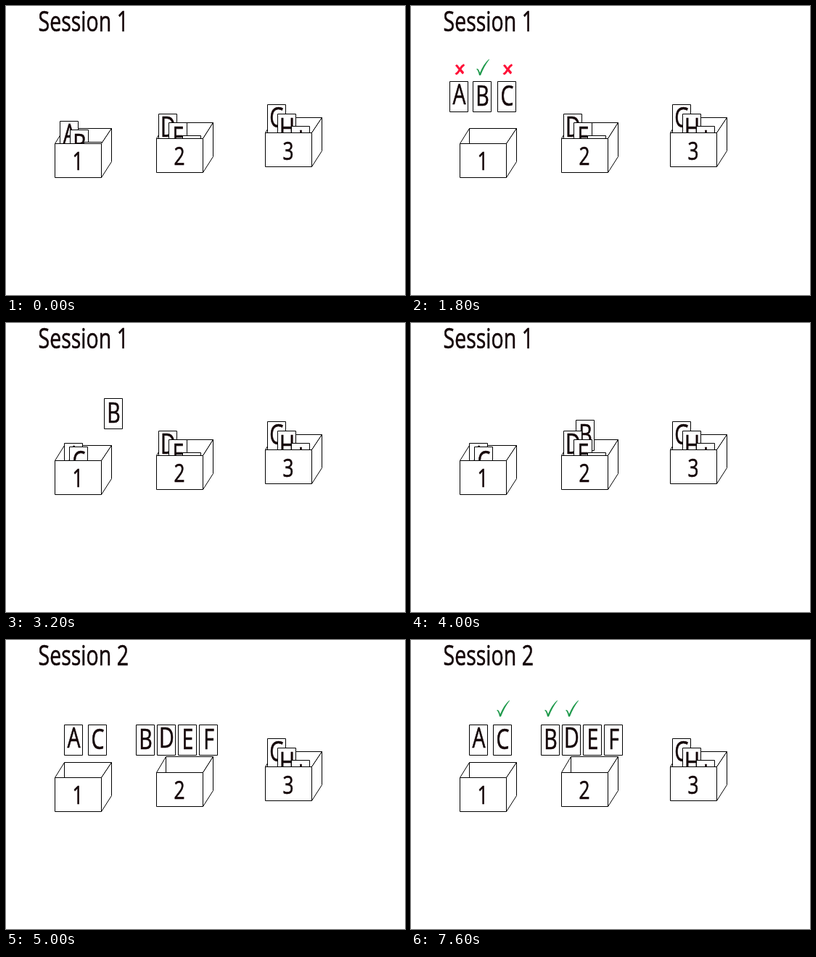
These frames come from a looping animation (550 px wide and 400 px high, 8000 ms). An HTML page with a canvas:

```html
<!DOCTYPE html>
<html lang="en">
<head>
<meta charset="utf-8">
<title>Card boxes</title>
<style>
  html, body { margin: 0; width: 100%; height: 100%; overflow: hidden; background: #fff; }
  canvas { display: block; }
</style>
</head>
<body>
<canvas id="stage" width="550" height="400"></canvas>
<script>
const ctx = document.getElementById('stage').getContext('2d');
const LOOP = 8000, TICK = 200, SESSION_2 = 21;
const INK = '#140608';
const CONDENSED = 0.75; // one narrow cut for all lettering

// Each box sits a little higher than the one before; its cards fan out from (cardX, cardY).
const boxes = [
  { x: 67, cardX: 74, cardY: 158.6 },
  { x: 207, cardX: 210, cardY: 149 },
  { x: 357, cardX: 360, cardY: 136.2 }
].map((box, i) => ({ ...box, y: 190 - 7.4 * i, digit: i + 1 }));

const cards = [...'ABCDEFGHI'].map((letter, i) => {
  const box = boxes[Math.floor(i / 3)], slot = i % 3;
  const spread = 2.5 * slot * (slot - 1);
  const home = { x: box.cardX + 14 * slot + spread, y: box.cardY + 12.4 * slot + spread };
  return { letter, home, baseline: slot ? 34 : 32, moves: [] };
});
const find = letter => cards.find(card => card.letter === letter);
const move = (letter, from, to, x, y) => find(letter).moves.push({ from, to, x, y });

[53, 85, 119].forEach((x, i) => move('ABC'[i], 0, 4, x, 104));
move('A', 10, 12, 80, 166);
move('C', 10, 12, 87, 171);
move('B', 14, 16, 135, 104);
move('B', 16, 19, 214, 118);
move('B', 19, 20, 227, 134);
[...'AC'].forEach((c, i) => move(c, SESSION_2, 25, 80 + 33 * i, 117));
[...'BDEF'].forEach((c, i) => move(c, SESSION_2, 25, 179 + 29 * i, 117));

// One card is marked every two ticks; crosses go first, then the ticks.
const quizzes = [
  { asked: 'ABC', known: 'B', start: 5, crossEnd: 11, tickEnd: 14, y: 85 },
  { asked: 'ACBDEF', known: 'CBD', start: 26, crossEnd: 38, tickEnd: 40, y: 95 }
];
const tickMark = {
  color: '#1f9a4c', dx: -10, dy: -12,
  path: new Path2D('M1 14Q4 12.5 6 19.5Q11 7 18.5 .5L19 1Q12 10 7 23L5 23Q3.5 16 1 14Z')
};
const crossMark = {
  color: '#ff1238', dx: -7, dy: -5.5,
  path: new Path2D('M1 3Q3 0 5 3L7 6Q9 2 13 .5L14 3Q11 5 9.5 8L13 12Q13 14 11 15L7.5 11Q5 15 2.5 16L.5 14Q4 12 5.5 8.5Z')
};

function text(str, x, y, size, align = 'center') {
  ctx.save();
  ctx.translate(x, y);
  ctx.scale(CONDENSED, 1);
  ctx.font = `${size}px "Open Sans", "Noto Sans", sans-serif`;
  ctx.textAlign = align;
  ctx.fillStyle = ctx.strokeStyle = INK;
  ctx.lineWidth = 0.6;
  ctx.fillText(str, 0, 0);
  ctx.strokeText(str, 0, 0);
  ctx.restore();
}

// Outlines lie on whole pixels.
function polygon(fill, ...points) {
  ctx.beginPath();
  for (const [x, y] of points) ctx.lineTo(Math.round(x) + 0.5, Math.round(y) + 0.5);
  ctx.closePath();
  ctx.fillStyle = fill;
  ctx.fill();
  ctx.strokeStyle = '#000';
  ctx.stroke();
}
const rect = (x, y, w, h) => polygon('#fff', [x, y], [x + w, y], [x + w, y + h], [x, y + h]);

function boxBack({ x, y }) {
  const top = y - 21.2;
  polygon('#fff', [x, y], [x + 13, top], [x + 13, y]);
  polygon('#fff', [x + 13, y], [x + 13, top], [x + 78, top], [x + 64, y]);
}

function boxFront({ x, y, digit }) {
  polygon('#fff', [x + 64, y], [x + 78, y - 21.2], [x + 78, y + 25], [x + 64, y + 47]);
  rect(x, y, 64, 47);
  text(digit, x + 32, Math.round(y + 37.4), 35);
}

function place({ home, moves }, step) {
  let { x, y } = home;
  for (const m of moves) {
    const p = Math.min(1, Math.max(0, (step - m.from) / (m.to - m.from)));
    x += (m.x - x) * p;
    y += (m.y - y) * p;
  }
  return { x: Math.round(x), y: Math.round(y) };
}

function drawCard(card, step) {
  const { x, y } = place(card, step);
  rect(x, y, 25, 42);
  text(card.letter, x + 13.5, y + card.baseline, 38);
}

function drawMarks({ asked, known, start, crossEnd, tickEnd, y }, step) {
  [...asked].forEach((letter, i) => {
    const right = known.includes(letter);
    if (step < start + 2 * i || step >= (right ? tickEnd : crossEnd)) return;
    const mark = right ? tickMark : crossMark;
    ctx.save();
    ctx.translate(place(find(letter), step).x + 14 + mark.dx, y + mark.dy);
    ctx.fillStyle = mark.color;
    ctx.fill(mark.path);
    ctx.restore();
  });
}

function draw(time) {
  const step = Math.floor(time % LOOP / TICK);
  ctx.fillStyle = '#fff';
  ctx.fillRect(0, 0, 550, 400);
  text(`Session ${step < SESSION_2 ? 1 : 2}`, 44.5, 35, 38, 'left');
  boxes.forEach(boxBack);
  cards.forEach(card => drawCard(card, step));
  boxes.forEach(boxFront);
  quizzes.forEach(quiz => drawMarks(quiz, step));
}

const start = performance.now();
function frame() {
  draw(performance.now() - start);
  requestAnimationFrame(frame);
}
frame();
</script>
</body>
</html>
```
